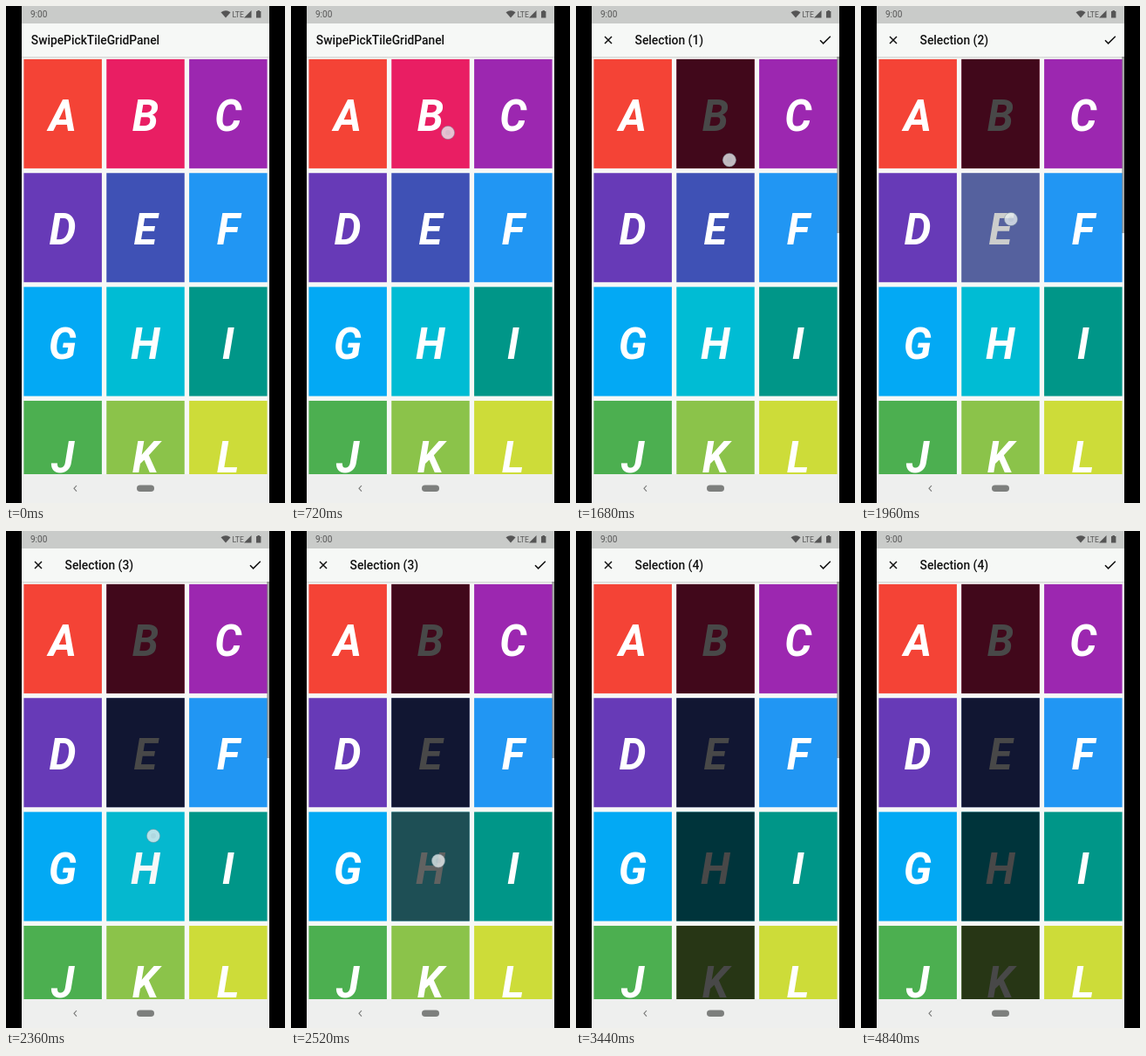
Animation, 320 px wide and 569 px high, one loop 4880 ms. Source, as an HTML page:

```html
<!DOCTYPE html>
<html lang="en">
<head>
<meta charset="utf-8">
<title>Drag selection</title>
<style>
  html, body { margin: 0; width: 100%; height: 100%; overflow: hidden; background: #000; }
  svg { display: block; width: 100%; height: 100%; font-family: Roboto, "Open Sans", sans-serif; }
  .head { font-size: 13.8px; font-weight: 500; fill: #111; }
  .letter { font-size: 49px; font-weight: 700; font-style: italic; text-anchor: middle; }
  .icon { fill: none; stroke: #111; stroke-width: 1.5; }
</style>
</head>
<body>
<svg viewBox="0 0 320 569">
  <defs>
    <clipPath id="listClip"><rect x="18" y="58" width="284" height="478"/></clipPath>
    <linearGradient id="shade" x2="0" y2="1">
      <stop offset="0" stop-opacity=".15"/>
      <stop offset="1" stop-opacity="0"/>
    </linearGradient>
  </defs>
  <rect width="320" height="569"/>
  <rect x="18" width="284" height="569" fill="#f6f8f6"/>

  <g clip-path="url(#listClip)">
    <g id="cells"></g>
    <rect x="18" y="58" width="284" height="2.5" fill="url(#shade)"/>
    <rect id="bar" x="299.3" y="58" width="2.7" height="202" fill="#000" fill-opacity=".34"/>
  </g>

  <rect x="18" width="284" height="20" fill="#c9cbc9"/>
  <g fill="#555">
    <text x="28" y="13.2" font-size="10">9:00</text>
    <path d="M246.5 7.2Q252 3.4 257.5 7.2L252 13.6Z"/>
    <text x="259.4" y="13" font-size="8.6" textLength="auto">LTE</text>
    <path d="M273 13.5L281.5 5V13.5Z"/>
    <path d="M287 6h1.5v-1h2.4v1h1.5v7.6h-5.4z"/>
  </g>

  <text id="title" class="head" x="28.8" y="44">SwipePickTileGridPanel</text>
  <g id="tools">
    <path class="icon" d="M33 35l8 8M41 35l-8 8"/>
    <text id="count" class="head" x="67.6" y="44"></text>
    <path class="icon" d="M280 39.3l3.6 3.6l8.2-8.2"/>
  </g>

  <rect x="18" y="536" width="284" height="33" fill="#eeefee"/>
  <path d="M81 549l-3 3.3l3 3.3" fill="none" stroke="#777" stroke-width="1.1"/>
  <rect x="150" y="548.5" width="20" height="7.5" rx="3.75" fill="#7d7f7d"/>

  <g id="dot">
    <circle r="7.6" fill="#e8eef0" fill-opacity=".78" stroke="#78909c" stroke-opacity=".5"/>
    <circle r="3" fill="#90a4ae" fill-opacity=".15"/>
  </g>
</svg>
<script>
const LOOP = 4880, STEP = 40, FADE = 250;
const colors = ["#f44336", "#e91e63", "#9c27b0", "#673ab7", "#3f51b5", "#2196f3",
                "#03a9f4", "#00bcd4", "#009688", "#4caf50", "#8bc34a", "#cddc39"];

// Start time of each selection, by cell index
const picks = { 1: 1238, 4: 1875, 7: 2333, 10: 2985 };
const starts = Object.values(picks);

// Finger path: time, x, y
const path = [[720, 180, 145], [1440, 180, 146], [1820, 173.5, 194], [1960, 172, 244],
              [2273, 169.5, 324], [2360, 169, 349], [2920, 169, 449],
              [3020, 169, 463], [3240, 169, 468]];
const DOWN = 720, LIFT = 3240, SPOT_FADE = 200, BAR_OUT = 4580;

const $ = id => document.getElementById(id);
const clamp = v => Math.min(1, Math.max(0, v));
const ease = v => (1 - Math.cos(Math.PI * clamp(v))) / 2;
const show = (el, v) => el.setAttribute("opacity", v);

function add(parent, tag, attrs, text = "") {
  const el = document.createElementNS("http://www.w3.org/2000/svg", tag);
  for (const key in attrs) el.setAttribute(key, attrs[key]);
  el.textContent = text;
  return parent.appendChild(el);
}

function tile(i, selected) {
  const x = 20.4 + (i % 3) * 94.85, y = 60.9 + Math.floor(i / 3) * 130.35;
  const box = { x, y, width: 89.5, height: 125 };
  const g = add($("cells"), "g", {});
  add(g, "rect", { ...box, fill: colors[i] });
  if (selected) add(g, "rect", { ...box, fill: "#000", "fill-opacity": 0.72 });
  add(g, "text", { class: "letter", x: x + 44.6, y: y + 82, fill: selected ? "#484848" : "#fff" },
      String.fromCharCode(65 + i));
  return g;
}

const fades = [];
colors.forEach((_, i) => {
  const plain = tile(i, false);
  if (picks[i]) fades.push({ plain, dark: tile(i, true), start: picks[i] });
});

function fingerAt(t) {
  const n = path.findIndex(p => p[0] > t);
  if (n < 0) return path[path.length - 1].slice(1);
  if (n === 0) return path[0].slice(1);
  const a = path[n - 1], b = path[n], k = (t - a[0]) / (b[0] - a[0]);
  return [a[1] + (b[1] - a[1]) * k, a[2] + (b[2] - a[2]) * k];
}

function draw(t) {
  for (const { plain, dark, start } of fades) {
    const p = ease((t - start) / FADE);
    show(plain, 1 - p);
    show(dark, p);
  }
  const count = starts.filter(s => t >= s).length;
  show($("title"), count ? 0 : 1);
  show($("tools"), count ? 1 : 0);
  $("count").textContent = `Selection (${count})`;
  show($("bar"), count ? 1 - clamp((t - BAR_OUT) / FADE) : 0);
  show($("dot"), t < DOWN ? 0 : 1 - clamp((t - LIFT) / SPOT_FADE));
  $("dot").setAttribute("transform", `translate(${fingerAt(t)})`);
}

const origin = performance.now();
function tick() {
  const t = (performance.now() - origin) % LOOP;
  draw(Math.floor(t / STEP) * STEP);
  requestAnimationFrame(tick);
}
draw(0);
requestAnimationFrame(tick);
</script>
</body>
</html>
```
